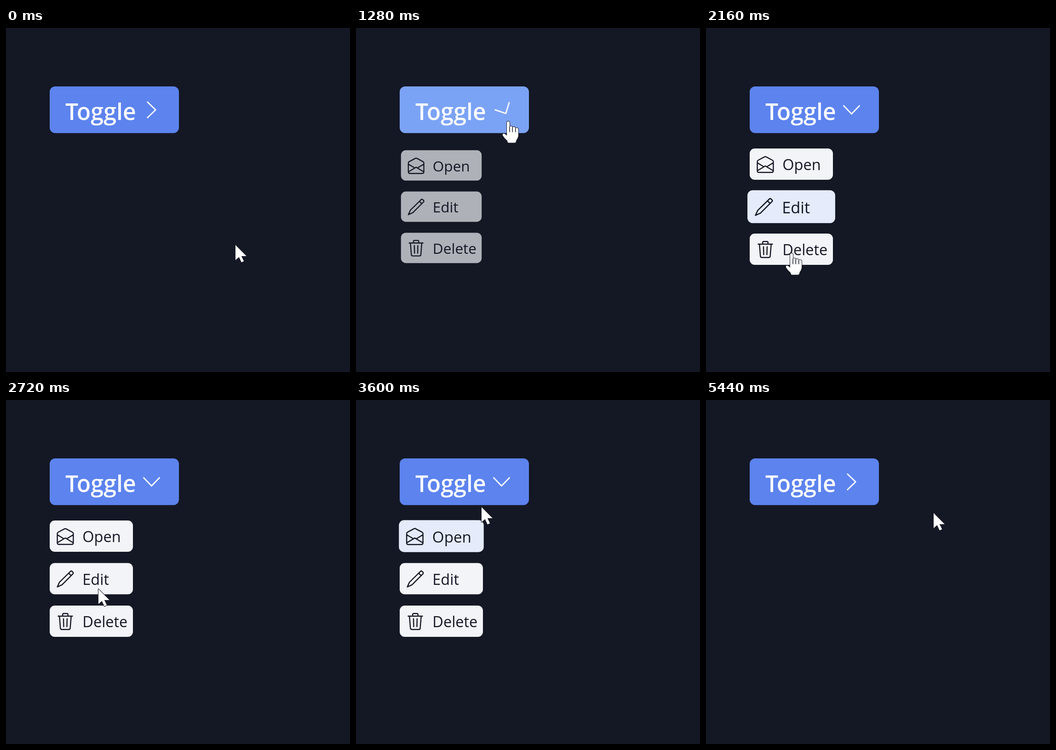
Write an HTML page with a canvas that moves like this. It is 748 px wide and 748 px high and loops after 5520 ms.

```html
<!DOCTYPE html>
<html lang="en">
<head>
<meta charset="utf-8">
<title>Toggle menu</title>
<style>
html, body { margin: 0; width: 100%; height: 100%; overflow: hidden; background: #141724; }
canvas { display: block; width: 748px; height: 748px; }
</style>
</head>
<body>
<canvas id="stage" width="748" height="748"></canvas>
<script>
const ctx = document.getElementById("stage").getContext("2d");
const LOOP = 5520, STEP = 80;
const OPEN_AT = 1090, TURN_BACK_AT = 4420, CLOSE_AT = 4515, FADE = 300;
const MENU = { x: 185.5, y: 388.5, w: 181, h: 68, pitch: 92.5 };
const BUTTON = { x: 95, y: 127, w: 281, h: 101.5 };
const BG = [20, 23, 36];
const CARD = [242, 244, 248], CARD_HOT = [229, 235, 250];
const BLUE = [92, 131, 238], BLUE_HOT = [123, 163, 245];
const FONT = '"Open Sans", "Noto Sans", sans-serif';

// Turning points of the pointer: time, x, y
const PATH = [
  [0, 499, 472], [560, 350, 214], [1280, 331, 203], [1600, 268, 266], [1920, 214, 342],
  [2080, 200, 418], [2160, 186, 490], [2320, 182, 551], [2640, 188, 525], [2720, 201, 411],
  [3360, 250, 266], [3600, 273, 233], [4560, 275.5, 221.5], [5120, 654, 310], [5440, 495, 246]
];

const ICONS = {
  Open: "M.5 5.4Q.5 4.5 1.3 4.1L7.3.9Q8 .5 8.7.9L14.7 4.1Q15.5 4.5 15.5 5.4V14Q15.5 15.5 14 15.5H2Q.5 15.5 .5 14Z" +
    "M.5 6.5L6.5 10.1M15.5 6.5L9.5 10.1M.8 13.8L8 9.5L15.2 13.8",
  Edit: "M13 .8Q13.6.3 14.2.8L15.3 1.9Q15.8 2.5 15.3 3.1L4.9 13.5L.5 15.5L2.5 11.1ZM11.2 2.6L13.5 4.9",
  Delete: "M1.3 3H14.7M5.5 3V1.5Q5.5.5 6.5.5H9.5Q10.5.5 10.5 1.5V3M2.5 3L3.4 14.2Q3.5 15.5 4.7 15.5H11.3" +
    "Q12.5 15.5 12.6 14.2L13.5 3M6.3 5.5L6.5 12.8M9.7 5.5L9.5 12.8"
};
const items = Object.entries(ICONS).map(([label, path], i) => {
  const cy = MENU.y + (i - 1) * MENU.pitch;
  return {
    label, cy, icon: new Path2D(path),
    x: MENU.x - MENU.w / 2, y: cy - MENU.h / 2, w: MENU.w, h: MENU.h
  };
});

const ARROW = new Path2D("M0 0V32.5L7.6 26L13 37.5L18.2 35L12.8 24H23.8Z");
const PALM = new Path2D("M-3 3Q-3 0 0 0Q3 0 3 3V12Q4 10.5 6 10.5Q9 10.5 9.2 13.5Q10.5 12 12.5 12Q15.5 12.5 15.7 15.5" +
  "Q17 14 19 14.3Q22 15 22 18V30Q21.5 36 17.5 41Q17 46.5 14 46.5H1Q-1.5 46.5 -2 42Q-8 37 -12 30.5" +
  "Q-13 27 -9.5 26.5Q-6 27.5 -3 31Z");
const FINGERS = new Path2D("M3 12V23M9.2 13.5V23M15.7 15.5V23");

const clamp = x => Math.max(0, Math.min(1, x));
const smooth = x => { x = clamp(x); return x * x * (3 - 2 * x); };
const blend = (a, b, p) => a.map((v, i) => v + (b[i] - v) * p);
const rgb = c => `rgb(${c.map(Math.round)})`;
const toggled = (t, off) => smooth((t - OPEN_AT) / FADE) * (1 - smooth((t - off) / FADE));

function pointer(t) {
  const i = Math.max(1, PATH.findIndex(p => p[0] >= t));
  const a = PATH[i - 1], b = PATH[i];
  return blend(a, b, clamp((t - a[0]) / (b[0] - a[0]))).slice(1);
}

function inside(area, t) {
  const [x, y] = pointer(t);
  const live = area === BUTTON || (t > OPEN_AT && t < CLOSE_AT);
  return live && x > area.x && x < area.x + area.w && y > area.y && y < area.y + area.h;
}

// Hover builds up and decays over the three preceding steps.
function hover(area, t) {
  const hits = [1, 2, 3].filter(n => inside(area, t - n * STEP)).length;
  return (hits / 3) ** 1.5;
}

function around(x, y, zoom, draw) {
  ctx.save();
  ctx.translate(x, y);
  ctx.scale(zoom, zoom);
  ctx.translate(-x, -y);
  draw();
  ctx.restore();
}

function box({ x, y, w, h }, radius, fill) {
  ctx.fillStyle = rgb(fill);
  ctx.beginPath();
  ctx.roundRect(x, y, w, h, radius);
  ctx.fill();
}

function text(str, x, y, font, fill) {
  ctx.font = `${font} ${FONT}`;
  ctx.fillStyle = fill;
  ctx.fillText(str, x, y);
}

function drawButton(t) {
  box(BUTTON, 12, blend(BLUE, BLUE_HOT, hover(BUTTON, t)));
  text("Toggle", 129, 199.5, "600 50px", "#fbfcff");

  const angle = toggled(t, TURN_BACK_AT) * Math.PI / 2;
  ctx.save();
  ctx.translate(316.5 + 6.5 * Math.sin(2 * angle), 178);
  ctx.rotate(angle);
  ctx.strokeStyle = "#f4f7ff";
  ctx.lineWidth = 3;
  ctx.beginPath();
  ctx.moveTo(-8.8, -17);
  ctx.lineTo(8.8, 0);
  ctx.lineTo(-8.8, 17);
  ctx.stroke();
  ctx.restore();
}

function drawItem(item, t, shown) {
  const heat = hover(item, t);
  const card = blend(CARD, CARD_HOT, clamp(heat * 6));
  around(MENU.x, item.cy, 1 + .1 * heat, () => {
    box(item, 11, blend(BG, card, shown));
    text(item.label, 166.2, item.cy + 13.3, "400 32.5px", rgb(BG));
    ctx.translate(110.4, item.cy - 18);
    ctx.scale(2.32, 2.32);
    ctx.strokeStyle = rgb(BG);
    ctx.lineWidth = 1.05;
    ctx.stroke(item.icon);
  });
}

function drawMenu(t) {
  const shown = toggled(t, CLOSE_AT);
  if (shown <= 0) return;
  around(MENU.x, MENU.y, .9 + .1 * shown, () => {
    for (const item of items) drawItem(item, t, shown);
  });
}

function drawCursor(t) {
  const hand = [BUTTON, ...items].some(area => inside(area, t - STEP));
  const shape = hand ? PALM : ARROW;
  ctx.save();
  ctx.translate(...pointer(t));
  ctx.strokeStyle = "#1a1d29";
  ctx.lineWidth = 2;
  ctx.stroke(shape);
  ctx.fillStyle = "#fff";
  ctx.fill(shape);
  if (hand) {
    ctx.lineWidth = 1.5;
    ctx.stroke(FINGERS);
  }
  ctx.restore();
}

function frame(now) {
  const t = Math.floor((now % LOOP) / STEP) * STEP;
  ctx.fillStyle = rgb(BG);
  ctx.fillRect(0, 0, 748, 748);
  ctx.lineCap = ctx.lineJoin = "round";
  drawButton(t);
  drawMenu(t);
  drawCursor(t);
}

const start = performance.now();
function tick() {
  frame(performance.now() - start);
  requestAnimationFrame(tick);
}
tick();
</script>
</body>
</html>
```
